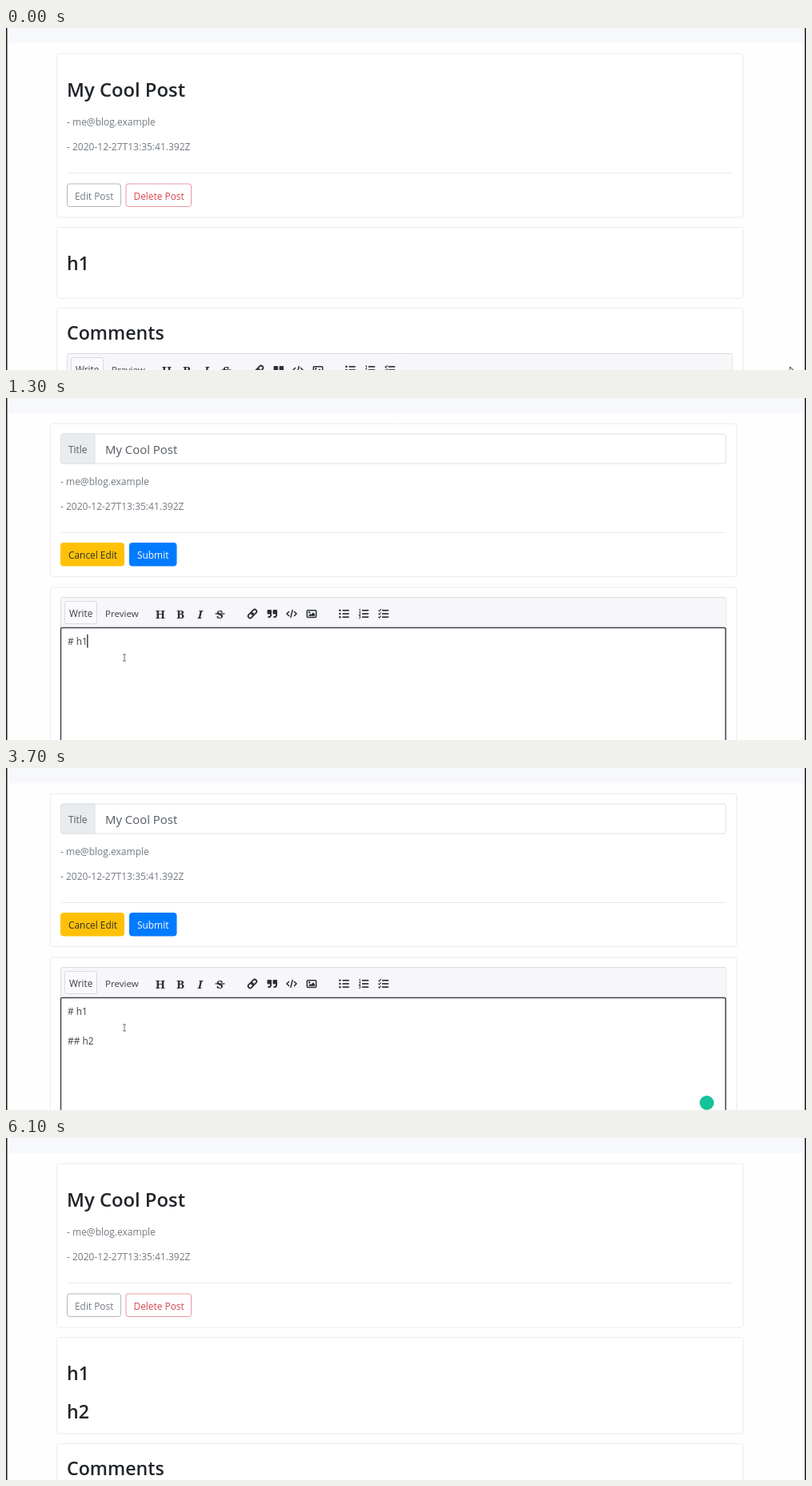
An HTML page with a canvas for the animation above (6.2 s loop, 1000 by 428 pixels).

```html
<!DOCTYPE html>
<html lang="en">
<head>
<meta charset="utf-8">
<title>Editing a post</title>
<style>
  html, body { margin: 0; width: 100%; height: 100%; overflow: hidden; background: #fefefe; }
  canvas { display: block; width: 100%; height: 100%; }
</style>
</head>
<body>
<canvas id="stage" width="1000" height="428"></canvas>
<script>
const ctx = document.getElementById('stage').getContext('2d');
const LOOP = 6200, STEP = 100;
const EDIT_AT = 800, FOCUS_AT = 1300, BADGE_AT = 1500, BLUR_AT = 4300, SAVED_AT = 4500;
const SANS = '"Open Sans", "Noto Sans", sans-serif';
const INK = '#212529', MUTED = '#747b82', LINE = '#ececee', ICON = '#2b3036';
const AUTHOR = '- me@blog.example', DATE = '- 2020-12-27T13:35:41.392Z';

// Editor contents from each moment on
const typing = [
  [1300, '# h1'], [1700, '# h1\n'], [1900, '# h1\n\n'], [2400, '# h1\n\n#'],
  [2500, '# h1\n\n##'], [2700, '# h1\n\n## '], [2900, '# h1\n\n## h'], [3100, '# h1\n\n## h2']
];

// Pointer path: time, x, y
const path = [
  [0, 980, 424], [100, 965, 412], [500, 118, 213], [700, 112, 210],
  [800, 129, 288], [1000, 148, 325], [3900, 148, 325], [4200, 194, 192],
  [4400, 194, 192], [4600, 192, 191], [4800, 192, 191], [5200, 380, 436]
];

function text(str, x, y, size = 12, color = MUTED, weight = 400) {
  ctx.font = `${weight} ${size}px ${SANS}`;
  ctx.fillStyle = color;
  ctx.fillText(str, x, y);
}

function box(x, y, w, h, { fill, stroke, radius = 3, width = 1 } = {}) {
  ctx.beginPath();
  ctx.roundRect(x, y, w, h, radius);
  if (fill) { ctx.fillStyle = fill; ctx.fill(); }
  if (stroke) { ctx.strokeStyle = stroke; ctx.lineWidth = width; ctx.stroke(); }
}

function line(points, color = ICON, width = 1.5) {
  ctx.beginPath();
  points.forEach(([x, y]) => ctx.lineTo(x, y));
  ctx.strokeStyle = color;
  ctx.lineWidth = width;
  ctx.stroke();
}

function shape(points, fill, stroke) {
  ctx.beginPath();
  points.forEach(([x, y]) => ctx.lineTo(x, y));
  ctx.closePath();
  ctx.fillStyle = fill;
  ctx.fill();
  ctx.strokeStyle = stroke;
  ctx.lineWidth = 1;
  ctx.stroke();
}

function at(x, y, draw) {
  ctx.save();
  ctx.translate(x, y);
  draw();
  ctx.restore();
}

const card = (x, y, h) => box(x + .5, y + .5, 858, h, { fill: '#fff', stroke: LINE });

function letter(ch, style = '') {
  ctx.font = `${style} bold 15px "Noto Serif", serif`;
  ctx.fillStyle = ICON;
  ctx.textAlign = 'center';
  ctx.fillText(ch, 0, 5.5);
}

function link() {
  ctx.rotate(-Math.PI / 4);
  box(-6.5, -2.5, 7.5, 5, { stroke: ICON, radius: 2.5, width: 1.8 });
  box(-1, -2.5, 7.5, 5, { stroke: ICON, radius: 2.5, width: 1.8 });
}

function quotes() {
  for (const x of [-6, 1]) {
    box(x, -5, 5.5, 5.5, { fill: ICON, radius: 1 });
    line([[x + 4.6, -2], [x + 4.6, 2], [x + 3.5, 3.8], [x + 1, 4.2]], ICON, 1.9);
  }
}

function code() {
  line([[-3, -3], [-6, 0], [-3, 3]]);
  line([[3, -3], [6, 0], [3, 3]]);
  line([[1.3, -5], [-1.3, 5]]);
}

function picture() {
  box(-5.7, -4.2, 11.4, 8.6, { stroke: ICON, radius: 1, width: 1.5 });
  box(-4, -2.8, 2.4, 2.4, { fill: ICON, radius: 1.2 });
  shape([[-3.5, 2.3], [-1.5, .5], [-.5, 1.3], [2, -1.2], [3.8, .8], [3.8, 2.3]], ICON, ICON);
}

function list(bullet) {
  for (const y of [-4.2, 0, 4.2]) {
    line([[-2, y], [6.3, y]], ICON, 1.7);
    bullet(y);
  }
}

const icons = [
  [125, () => letter('H')],
  [150, () => letter('B')],
  [174.5, () => letter('I', 'italic')],
  [199.5, () => { letter('S'); line([[-6, 0], [6, 0]], ICON, 1.3); }],
  [240, link],
  [264.5, quotes],
  [289, code],
  [314, picture],
  [354.5, () => list(y => box(-6.3, y - 1.2, 2.4, 2.4, { fill: ICON, radius: 1 }))],
  [379, () => list(y => text(String(Math.round(y / 4.2) + 2), -6.3, y + 1.8, 5, ICON, 700))],
  [404, () => list(y => line([[-6.5, y - .3], [-5.3, y + 1], [-3.2, y - 1.6]], ICON, 1.1))]
];

function editor(x, y) {
  at(x, y, () => {
    box(.5, .5, 831.5, 240, { fill: '#fff', stroke: '#dcdde2', radius: 2 });
    box(1, 1, 830.5, 37, { fill: '#f7f7fa', radius: 1 });
    line([[0, 38.5], [832, 38.5]], '#dcdde4', 1);
    box(5.5, 5.5, 40, 28, { fill: '#fafafc', stroke: '#d9dbdf', radius: 2 });
    text('Write', 11, 24.5, 11.8, '#3b4046');
    text('Preview', 56, 24.5, 11.6, '#3b4046');
    icons.forEach(([dx, draw]) => at(dx, 21, draw));
  });
}

function button(label, x, y, w, fill, color, stroke) {
  box(x + .5, y + .5, w - 1, 28.5, { fill, stroke: stroke || fill });
  text(label, x + 10, y + 20, 11.9, color);
}

function postView(saved, editHover) {
  const shift = saved ? 32 : 0;
  card(63, 31.5, 205);
  text('My Cool Post', 76, 86, 23.8, INK, 600);
  text(AUTHOR, 76, 122);
  text(DATE, 76, 152.5);
  line([[76, 181.5], [909, 181.5]], LINE, 1);
  button('Edit Post', 76, 194.5, 68, editHover ? '#6c757d' : '#fff', editHover ? '#fff' : MUTED, '#b3b6bb');
  button('Delete Post', 149.5, 194.5, 82.5, '#fff', '#d54350', '#eb96a0');
  card(63, 249, 88.5 + shift);
  text('h1', 76, 303, 23.2, INK, 600);
  if (saved) text('h2', 76, 350.5, 23.2, INK, 600);
  card(63, 350 + shift, 200);
  text('Comments', 76, 389.5 + shift, 23.2, INK, 600);
  editor(76, 407 + shift);
}

function editView(t, submitHover) {
  card(55, 31.5, 191.5);
  box(68.5, 45, 831.5, 37, { fill: '#fff', stroke: '#dde0e4' });
  box(68.5, 45, 42.5, 37, { fill: '#e9ecef', stroke: '#dde0e4', radius: [3, 0, 0, 3] });
  text('Title', 78, 69, 11.9, '#565c63');
  text('My Cool Post', 124, 70, 14.9, '#555b62');
  text(AUTHOR, 68, 109);
  text(DATE, 68, 139.5);
  line([[68, 168.5], [900, 168.5]], '#e9e9ec', 1);
  button('Cancel Edit', 68, 181, 80, '#ffc107', '#30302b');
  button('Submit', 154, 181, 59.5, submitHover ? '#0069d9' : '#007bff', '#fff');
  card(55, 236.5, 240);
  editor(68, 249);
  textarea(t);
}

function textarea(t) {
  const [since, content] = typing.filter(([from]) => from <= t).pop() || typing[0];
  const lines = content.split('\n');
  const lineY = i => 309 + i * 18.4;
  lines.forEach((str, i) => text(str, 77, lineY(i), 11.9, '#3f444a'));

  if (t >= FOCUS_AT && t < BLUR_AT) {
    box(68.5, 287.5, 831, 160, { stroke: '#42464d', radius: 2, width: 1.5 });
    if (Math.floor((t - since) / 530) % 2 === 0) {
      const last = lines.length - 1;
      const x = 77 + ctx.measureText(lines[last]).width;
      line([[x, lineY(last) - 13], [x, lineY(last) + 3.5]], INK, 1.3);
    }
  }
  if (t >= BADGE_AT) box(867, 410, 18, 18, { fill: '#15c39a', radius: 9 });
}

function pointerAt(t) {
  const next = path.findIndex(([time]) => time > t);
  if (next < 0) return path[path.length - 1].slice(1);
  const [t0, x0, y0] = path[next - 1], [t1, x1, y1] = path[next];
  const k = (t - t0) / (t1 - t0), e = k * k * (3 - 2 * k);
  return [x0 + (x1 - x0) * e, y0 + (y1 - y0) * e];
}

const pointers = {
  arrow() {
    shape([[0, 0], [0, 8.5], [2, 6.8], [3.3, 9.7], [4.6, 9.1], [3.4, 6.3], [6, 6]], '#fff', '#33363b');
  },
  hand() {
    shape([[.5, 1], [2, .5], [2.6, 4], [6, 5], [6.3, 8], [5.3, 11], [1.3, 11], [-2, 7.3], [-1.2, 6.3], [.6, 7.4]],
      '#fff', '#3c3f44');
  },
  beam() {
    line([[-2, -4], [2, -4]], '#6f7277', 1);
    line([[-2, 4], [2, 4]], '#6f7277', 1);
    line([[0, -4], [0, 4]], '#6f7277', 1);
  }
};

function draw(t) {
  const editing = t >= EDIT_AT && t < SAVED_AT;
  const [px, py] = pointerAt(t);
  const inside = (x, y, w, h) => px >= x && px <= x + w && py >= y && py <= y + h;
  const editHover = t < EDIT_AT && inside(76, 194, 68, 30);
  const submitHover = editing && inside(154, 181, 60, 30);

  ctx.fillStyle = '#fefefe';
  ctx.fillRect(0, 0, 1000, 428);
  ctx.fillStyle = '#f7f8fc';
  ctx.fillRect(0, 0, 1000, 19);
  if (editing) editView(t, submitHover);
  else postView(t >= SAVED_AT, editHover);

  let pointer = 'arrow';
  if (editHover || submitHover || t === EDIT_AT) pointer = 'hand';
  else if (editing && inside(68, 288, 832, 140)) pointer = 'beam';
  at(px, py, pointers[pointer]);

  ctx.fillStyle = '#17171b';
  ctx.fillRect(0, 0, 1.5, 428);
  ctx.fillRect(998.5, 0, 1.5, 428);
}

const start = performance.now();
function tick() {
  const t = (performance.now() - start) % LOOP;
  draw(Math.floor(t / STEP) * STEP);
  requestAnimationFrame(tick);
}
tick();
</script>
</body>
</html>
```
